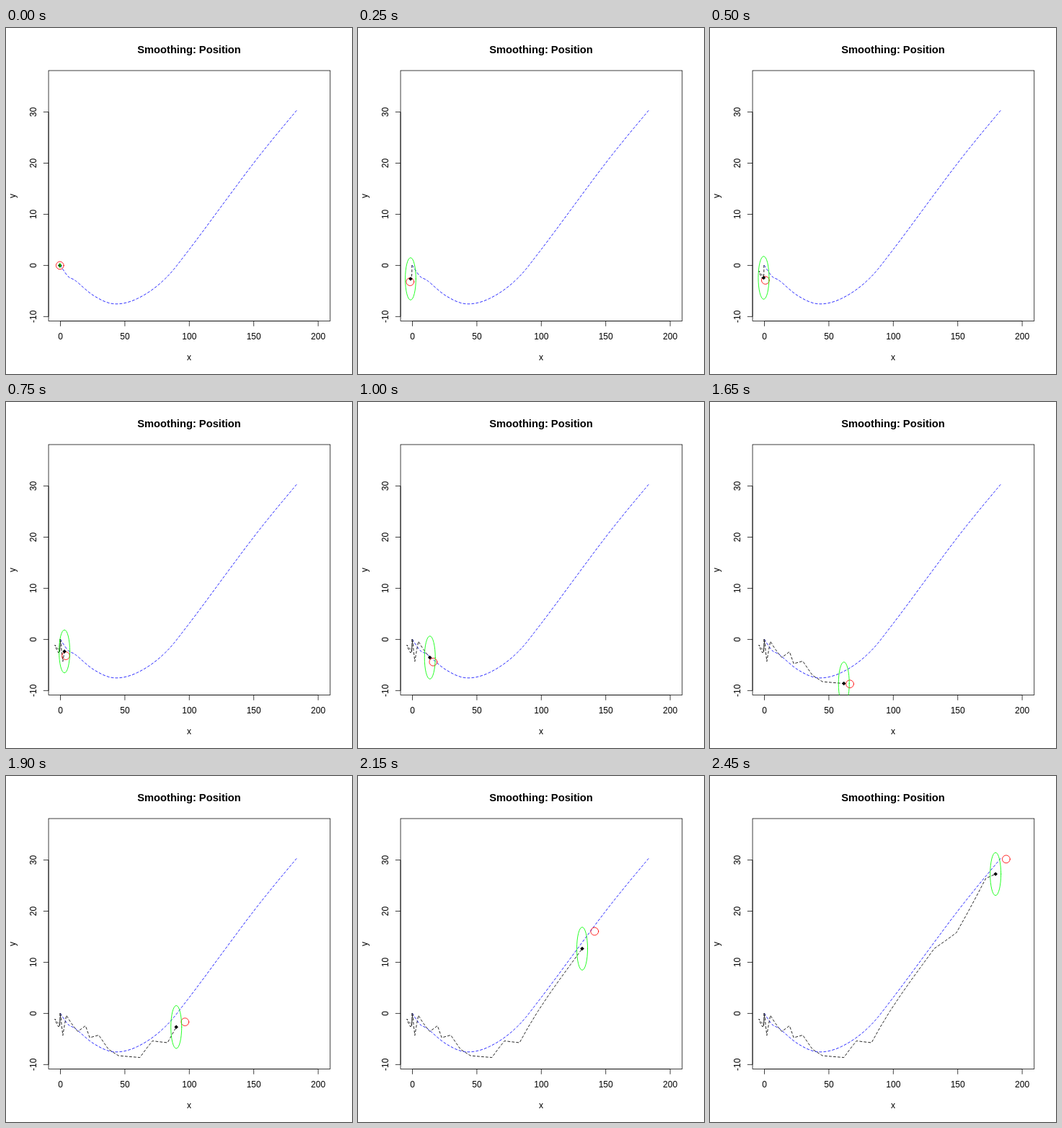
An HTML page that plays this animation: 480 by 480 pixels, repeating every 2500 ms.

```html
<!DOCTYPE html>
<html lang="en">
<head>
<meta charset="utf-8">
<title>Smoothing: Position</title>
<style>
  html, body { margin: 0; width: 100%; height: 100%; overflow: hidden; background: #fff; }
  svg { display: block; width: 100vw; height: 100vh; }
  text { font: 12px "Liberation Sans", Arial, sans-serif; text-anchor: middle; }
  .title { font-size: 14.7px; font-weight: bold; }
  .line { fill: none; stroke-width: .85; stroke-linecap: round; stroke-linejoin: round; }
  .dash { stroke-dasharray: 3 3; }
  .frame { fill: none; stroke: #000; stroke-width: .75; }
</style>
</head>
<body>
<svg viewBox="0 0 480 480">
  <defs><clipPath id="plot"><rect x="59" y="59" width="391" height="347.6"/></clipPath></defs>
  <rect width="480" height="480" fill="#fff"/>
  <text class="title" x="254" y="35">Smoothing: Position</text>
  <text x="254" y="461">x</text>
  <text transform="translate(13 233) rotate(-90)">y</text>
  <rect class="frame" x="59.04" y="59.04" width="390.72" height="347.52"/>
  <g id="axes"></g>
  <g clip-path="url(#plot)">
    <path id="smooth" class="line dash" stroke="#00f"/>
    <path id="trail" class="line dash" stroke="#000"/>
    <circle id="ring" class="line" r="5.4" stroke="#f00"/>
    <path id="dot" d="M-2.8 0L0-2.8L2.8 0L0 2.8Z"/>
    <ellipse id="spread" class="line" stroke="#0f0"/>
  </g>
</svg>
<script>
const $ = id => document.getElementById(id);
const STEP = 50, COUNT = 50;
const LEFT = 59.04, BOTTOM = 406.56, TICK = 7.2;
const px = x => 75.5 + x * 1.788;
const py = y => 329.4 - y * 7.095;

// Key points of the smoothed curve
const curve = [
  [75.5, 329.4], [86, 344.5], [97, 351], [122, 371.5], [150, 382.7],
  [182, 375.5], [218, 350.5], [254, 307.5], [343.5, 187.5], [403, 114.5]
];

// Turning points of the noisy height: step, y
const turns = [
  [0, 329.4], [5, 348], [7, 337], [10, 346.5], [12, 329.5], [14, 360],
  [16, 332], [20, 354.5], [22, 346.5], [23, 363], [25, 359.5], [27, 379],
  [29, 388], [33, 390.5], [35, 367.5], [37, 370], [43, 239.5],
  [45, 217.5], [48, 142], [49, 136]
];

// Steady acceleration after step 10 with a slow wobble, and one early dip left
function xAt(n) {
  const s = .213 * Math.max(0, n - 10) ** 2;
  return 74.8 + s + 6 * Math.sin(s / 32.8) - 7 * Math.exp(-((n - 7) ** 2) / 3);
}

function yAt(n) {
  const i = Math.max(1, turns.findIndex(k => k[0] >= n));
  const [n0, y0] = turns[i - 1], [n1, y1] = turns[i];
  return y0 + (y1 - y0) * (n - n0) / (n1 - n0);
}

const track = Array.from({ length: COUNT }, (_, n) => [xAt(n), yAt(n)]);

const polyline = pts => "M" + pts.map(p => p.join()).join("L");

function spline(pts) {
  let d = "M" + pts[0].join();
  for (let i = 0; i < pts.length - 1; i++) {
    const a = pts[i], b = pts[i + 1];
    const before = pts[i - 1] || a, after = pts[i + 2] || b;
    const c1 = a.map((v, k) => v + (b[k] - before[k]) / 6);
    const c2 = b.map((v, k) => v - (after[k] - a[k]) / 6);
    d += "C" + [...c1, ...c2, ...b].join();
  }
  return d;
}

function set(id, attrs) {
  for (const k in attrs) $(id).setAttribute(k, attrs[k]);
}

function drawAxes() {
  let lines = `M${px(0)} ${BOTTOM}H${px(200)}M${LEFT} ${py(-10)}V${py(30)}`;
  let labels = "";
  for (let v = 0; v <= 200; v += 50) {
    lines += `M${px(v)} ${BOTTOM}v${TICK}`;
    labels += `<text x="${px(v)}" y="432">${v}</text>`;
  }
  for (let v = -10; v <= 30; v += 10) {
    lines += `M${LEFT} ${py(v)}h${-TICK}`;
    labels += `<text transform="translate(42 ${py(v)}) rotate(-90)">${v}</text>`;
  }
  $("axes").innerHTML = `<path class="frame" d="${lines}"/>` + labels;
}

function render(ms) {
  const n = Math.floor(ms / STEP) % COUNT;
  const [x, y] = track[n];
  // The ring runs ahead by the mean velocity of the last three steps
  const past = track[Math.max(0, n - 3)];
  const ahead = (now, then) => now + (now - then) / 3 * 1.1;
  const grow = 1 - Math.exp(-n * .8);
  set("trail", { d: polyline(track.slice(0, n + 1)) });
  set("ring", { cx: ahead(x, past[0]), cy: ahead(y, past[1]) });
  set("dot", { transform: `translate(${x} ${y})` });
  set("spread", { cx: x, cy: y, rx: .8 + 6.7 * grow, ry: 3 + 26.8 * grow });
}

drawAxes();
set("smooth", { d: spline(curve) });
render(0);
let start;
function tick(now) {
  if (start === undefined) start = now;
  render(now - start);
  requestAnimationFrame(tick);
}
requestAnimationFrame(tick);
</script>
</body>
</html>
```
